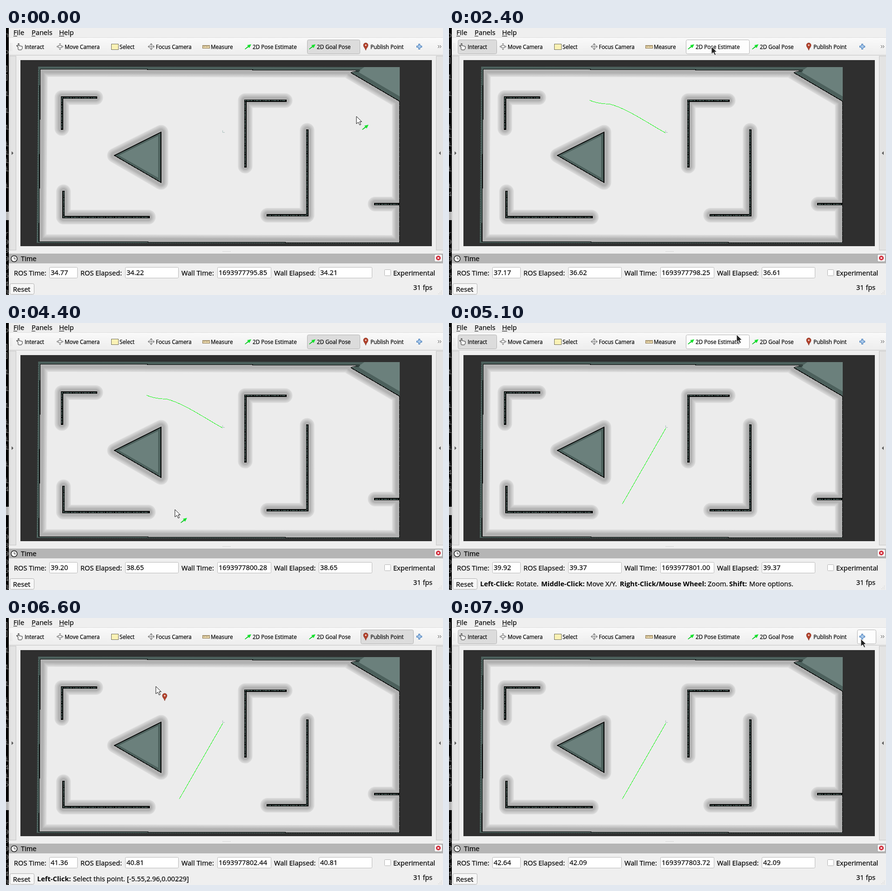
An HTML page for the animation above (8000 ms loop, 939 by 574 pixels).

```html
<!DOCTYPE html>
<html lang="en">
<head>
<meta charset="utf-8">
<title>Map viewer</title>
<style>
html, body { margin: 0; width: 100%; height: 100%; overflow: hidden; background: #efefef; }
svg { display: block; width: 939px; height: 574px; }
text { font: 14.6px "Open Sans", "Noto Sans", sans-serif; fill: #000; stroke: #000; stroke-width: .25px; white-space: pre; }
.tool { font-size: 11.7px; }
.bold { font-weight: 700; stroke: none; }
.term { font: 15px "Liberation Mono", monospace; fill: #858585; stroke: none; }
.field { fill: #fff; stroke: #b9b9b9; }
.crisp { shape-rendering: crispEdges; }
</style>
</head>
<body>
<svg viewBox="0 0 939 574" xmlns="http://www.w3.org/2000/svg">
  <defs>
    <linearGradient id="bar" x2="0" y2="1">
      <stop stop-color="#fafafa"/><stop offset="1" stop-color="#ededed"/>
    </linearGradient>
    <clipPath id="free"><path d="M74 89L759 91L741 96L845 157V461L71 459Z"/></clipPath>
    <clipPath id="map"><rect x="31" y="69" width="815" height="400"/></clipPath>
    <clipPath id="log"><rect width="6" height="368"/></clipPath>
    <g id="arrow">
      <path d="M-7 5L0 -1L-2 -3L7 -5L3 3L1 1L-6 6Z" fill="#12e32b"/>
      <path d="M-6 5L1 0" stroke="#0aa51d" fill="none"/>
    </g>
    <g id="pin">
      <path d="M0 8C-1 3 -5 1 -5 -3A5 5 0 0 1 5 -3C5 1 1 3 0 8Z" fill="#b2402a" stroke="#7c2d20" stroke-width=".7"/>
      <circle cy="-3" r="1.7" fill="#f3ddd6"/>
    </g>
    <g id="cross" fill="none" stroke="#777">
      <path d="M0 -7V7M-7 0H7M-2 -5L0 -7L2 -5M-2 5L0 7L2 5M-5 -2L-7 0L-5 2M5 -2L7 0L5 2"/>
    </g>
  </defs>

  <rect width="939" height="574" fill="#efefef"/>
  <rect width="6" height="574" fill="#000"/>
  <g clip-path="url(#log)"><g id="lines"></g></g>
  <rect y="395" width="6" height="18" fill="#b8b8b8"/>
  <g id="pane"></g>

  <rect x="6" y="20" width="933" height="38" fill="url(#bar)"/>
  <path d="M6 20.500H939" stroke="#dedede"/>
  <path d="M6 58.500H939" stroke="#c4c4c4"/>
  <path d="M9.500 33V49M12.500 33V49" stroke="#c2c2c2" stroke-dasharray="1 2"/>
  <path d="M16 17.500H24M55 17.500H63M114 17.500H125" stroke="#000"/>
  <g id="buttons"></g>
  <g id="icons">
    <path d="M26 46V41L23 39V37L26 39V33.500H28V38L35 39.500V44L33 47H27Z" fill="#fff" stroke="#222"/>
    <use href="#cross" x="116" y="40"/>
    <rect x="112.500" y="37.500" width="7" height="5" fill="#eee" stroke="#777"/>
    <rect x="226.500" y="34.500" width="15" height="12" fill="#fbf2b5" stroke="#33331f" stroke-dasharray="2 1"/>
    <use href="#cross" x="312" y="40"/>
    <circle cx="312" cy="40" r="4.500" fill="none" stroke="#777"/>
    <rect x="422.500" y="37.500" width="15" height="6" fill="#ead9ae" stroke="#85714b"/>
    <path d="M425.500 38V41M428.500 38V40M431.500 38V41M434.500 38V40" stroke="#85714b"/>
    <use href="#arrow" x="520" y="40"/>
    <use href="#arrow" x="658" y="40"/>
    <use href="#pin" x="773" y="40"/>
    <path d="M886.500 34.500H889.500V38.500H893.500V41.500H889.500V45.500H886.500V41.500H882.500V38.500H886.500Z" fill="#b9d6f4" stroke="#2a67ac"/>
    <path d="M928 37L931 40L928 43M932 37L935 40L932 43" fill="none" stroke="#444"/>
  </g>

  <rect x="7.500" y="60.500" width="14" height="417" fill="#e3e3e3" stroke="#c6c6c6"/>
  <rect x="924.500" y="60.500" width="15" height="417" fill="#e3e3e3" stroke="#c6c6c6"/>
  <path d="M12 265V273L16 269ZM934 265V273L930 269Z" fill="#555"/>

  <rect x="31" y="69" width="884" height="400" fill="#2f2f2f"/>
  <path d="M69 83L846 84V463L66 462Z" fill="#4c605c"/>
  <path d="M74 89L759 91L741 96L845 157V461L71 459Z" fill="#ececec"/>
  <g id="halo" clip-path="url(#free)" fill="none" stroke-linecap="round" stroke-linejoin="round"></g>
  <path d="M756 94L770 84H846V147Z" fill="#6b807c"/>
  <circle cx="756" cy="91" r="5" fill="#4c605c"/>
  <g class="crisp" fill="none" stroke="#000">
    <path d="M760 90.500H530V89.500H304V88.500H73.500L71 459.500H305V460.500H600V461.500H845" stroke-width="1.500"/>
    <path d="M741 96L845 157" stroke-width="1.500"/>
    <path d="M845.500 157V462" stroke-dasharray="9 1"/>
    <path d="M69.500 88L67.500 456M76 462.500H840" stroke="#1d2725" stroke-dasharray="1 4"/>
    <path d="M741 96L748 93L758 94"/>
    <path d="M233 274L333 224V332Z" fill="#4c605c" stroke-width="1.500"/>
  </g>
  <path d="M243 274L327 232V322Z" fill="#6b807c"/>
  <g id="walls" class="crisp" clip-path="url(#map)" fill="none"></g>
  <path d="M465.500 220V224.500H470" fill="none" stroke="#a9c0bd"/>
  <path id="route" class="crisp" fill="none" stroke="#1df51d"/>

  <path d="M466 480.500H482" stroke="#aaa" stroke-dasharray="1 2"/>
  <rect x="6" y="485" width="933" height="21" fill="#b5b5b5"/>
  <circle cx="17.500" cy="496" r="6.500" fill="#fff" stroke="#222" stroke-width="1.500"/>
  <path d="M17.500 492V496.500H21" fill="none" stroke="#222"/>
  <rect x="920.500" y="486.500" width="17" height="16" rx="3" fill="#f5f5f5" stroke="#999"/>
  <circle cx="929" cy="494.500" r="5" fill="#cf2130"/>
  <path d="M927 492.500L931 496.500M931 492.500L927 496.500" stroke="#fff" stroke-width="1.300"/>
  <g id="fields"></g>
  <rect x="813.500" y="519.500" width="13" height="13" rx="1" fill="#fff" stroke="#b5b5b5"/>
  <rect x="8.500" y="549.500" width="52" height="23" rx="3" fill="#f7f7f7" stroke="#b0b0b0"/>
  <path d="M929 571.500H938M932 568.500H938M935 565.500H938" stroke="#bbb" stroke-dasharray="1 2"/>
  <g id="labels"></g>
  <g id="status"></g>

  <g id="cursor">
    <path id="pointer" d="M0 0V16L4 12.500L7 18.500L9.500 17.500L6.800 11.500H11.500Z"/>
    <use id="badge" x="19" y="23"/>
  </g>
</svg>
<script>
const LOOP = 8000, STEP = 100;
const $ = id => document.getElementById(id);

function add(parent, tag, attrs, text = '') {
  const el = document.createElementNS('http://www.w3.org/2000/svg', tag);
  for (const k in attrs) el.setAttribute(k, attrs[k]);
  el.textContent = text;
  return parent.appendChild(el);
}
const label = (parent, x, y, text, cls = '') => add(parent, 'text', { x, y, class: cls }, text);

// Map obstacles and their inflated cost bands
const walls = [
  'M193 149.5H120V216', 'M123.5 352V406.5H306', 'M600 156H514V297',
  'M647 220V402.5H562', 'M793 378.5H845'
].join('');
const outlines = walls + 'M233 274L333 224V332ZM74 89L759 91L741 96L845 157V461L71 459Z';
const bands = [[15.5, '#d8d8d8'], [13, '#cccccc'], [10.5, '#bfbfbf'], [8, '#b1b1b1']];
for (const [r, stroke] of bands) add($('halo'), 'path', { d: outlines, stroke, 'stroke-width': 2 * r });
add($('walls'), 'path', { d: walls, stroke: '#000', 'stroke-width': 5, 'stroke-linecap': 'square' });
add($('walls'), 'path', { d: walls, stroke: '#4c605c', 'stroke-width': 2, 'stroke-dasharray': '7 1 3 2 5 1' });

// Toolbar: button edges and caption position
const tools = {
  interact: [19, 103, 'Interact', 40], move: [104, 219, 'Move Camera', 126],
  select: [220, 299, 'Select', 244], focus: [300, 416, 'Focus Camera', 322],
  measure: [417, 508, 'Measure', 440], pose: [509, 646, '2D Pose Estimate', 530],
  goal: [647, 761, '2D Goal Pose', 668], publish: [762, 876, 'Publish Point', 783],
  plus: [877, 918, '', 0]
};
const buttons = {};
for (const [name, [x0, x1, text, x]] of Object.entries(tools)) {
  buttons[name] = add($('buttons'), 'rect', { x: x0 + .5, y: 25.5, width: x1 - x0 - 1, height: 30, rx: 3 });
  label($('icons'), x, 45, text, 'tool');
}

const captions = [
  [16, 15, 'File'], [55, 15, 'Panels'], [114, 15, 'Help'], [32, 501, 'Time'],
  [17, 532, 'ROS Time:'], [160, 532, 'ROS Elapsed:'], [377, 532, 'Wall Time:'],
  [576, 532, 'Wall Elapsed:'], [832, 532, 'Experimental'], [15, 567, 'Reset'], [875, 563, '31 fps']
];
captions.forEach(c => label($('labels'), ...c));

const values = [[93, 61], [256, 115], [454, 116], [672, 115]].map(([x, width]) => {
  add($('fields'), 'rect', { x: x + .5, y: 514.5, width: width - 1, height: 23, rx: 2, class: 'field' });
  return label($('fields'), x + 3, 531, '');
});

// Terminal edge behind the window
const column = (id, y, chars) =>
  [...chars].forEach((c, i) => label($(id), -3, y + 18 * i, c, 'term'));
column('lines', 20, 'h o ]] 1 1 1 iiii i i4i5');
column('pane', 447, 'r9890543');

// Timelines
const cursorKeys = [
  [0, 753, 190], [600, 302, 155], [900, 230, 136], [1200, 180, 109], [1600, 300, 95],
  [2100, 510, 50], [2400, 564, 40], [2600, 570, 41], [2900, 670, 80], [3200, 690, 60],
  [3400, 678, 43], [3600, 676, 42], [3800, 650, 90], [4300, 372, 389], [4600, 345, 425],
  [4800, 470, 230], [5100, 618, 25], [5500, 760, 38], [5800, 800, 41], [6100, 620, 85],
  [6600, 322, 147], [7000, 322, 147], [7400, 620, 100], [7900, 885, 45]
];
const clockKeys = [[0, 0], [1200, 1.21], [2400, 2.4], [3600, 3.61], [5100, 5.15], [6600, 6.59], [7900, 7.87]];
const toolKeys = [[0, 'goal'], [1100, 'interact'], [2600, 'pose'], [3400, 'goal'], [4700, 'interact'], [5800, 'publish'], [7000, 'interact']];
const badgeKeys = [[0, 'arrow'], [1300, ''], [2600, 'arrow'], [4700, ''], [5800, 'pin'], [7000, '']];
const statusKeys = [[0, ''], [1100, 'rotate'], [1700, ''], [2600, 'drag'], [3700, ''], [4700, 'rotate'], [5200, ''], [6400, 'point'], [7000, 'rotate'], [7400, '']];
const routeKeys = [[0, ''], [1100, 'M302 155C314 161 330 163 345 163.5C380 172 420 200 465 225.5'], [4700, 'M466 226L372.5 389']];
const scrollKeys = [[0, 0], [1100, -36], [4700, -72]];

const held = (keys, t) => keys.filter(k => k[0] <= t).pop()[1];
function tween(keys, t) {
  const i = keys.findIndex(k => k[0] > t);
  if (i < 0) return keys[keys.length - 1].slice(1);
  const a = keys[i - 1], b = keys[i], p = (t - a[0]) / (b[0] - a[0]);
  return a.slice(1).map((v, j) => v + (b[j + 1] - v) * p);
}

const hints = {
  '': () => [],
  rotate: () => [
    [67, 'Left-Click:', 1], [144, 'Rotate.'], [198, 'Middle-Click:', 1], [295, 'Move X/Y.'],
    [367, 'Right-Click/Mouse Wheel:', 1], [556, 'Zoom.'], [602, 'Shift:', 1], [645, 'More options.']
  ],
  drag: () => [[67, 'Click and drag mouse to set position/orientation.']],
  point: (x, y) => [
    [67, 'Left-Click:', 1],
    [144, `Select this point. [${((x - 465.1) / 25.8).toFixed(2)},${((223.4 - y) / 25.8).toFixed(2)},0.00229]`]
  ]
};

function draw(t) {
  const [x, y] = tween(cursorKeys, t), onMap = y > 69;
  const active = held(toolKeys, t);

  for (const name in tools) {
    const [x0, x1] = tools[name], on = name === active;
    const hover = y >= 25 && y < 57 && x >= x0 && x <= x1;
    buttons[name].setAttribute('fill', on ? '#dcdcdc' : hover ? '#fdfdfd' : 'none');
    buttons[name].setAttribute('stroke', on || hover ? '#b3b3b3' : 'none');
  }

  const [run] = tween(clockKeys, t);
  const lag = t / STEP % 24 ? 0 : .01;
  const clocks = [34.77 + run, 34.22 + run, 1693977795.85 + run, 34.22 + run - lag];
  clocks.forEach((v, i) => values[i].textContent = v.toFixed(2));

  $('status').textContent = '';
  for (const [sx, text, bold] of hints[held(statusKeys, t)](x, y))
    label($('status'), sx, 566, text, bold ? 'bold' : '');

  $('route').setAttribute('d', held(routeKeys, t));
  $('lines').setAttribute('transform', `translate(0 ${held(scrollKeys, t)})`);

  const badge = held(badgeKeys, t);
  $('cursor').setAttribute('transform', `translate(${Math.round(x)} ${Math.round(y)})`);
  $('pointer').setAttribute('fill', onMap ? '#fff' : '#222');
  $('pointer').setAttribute('stroke', onMap ? '#111' : '#eee');
  $('badge').setAttribute('href', onMap && badge ? '#' + badge : '#none');
}

const start = performance.now();
let shown = -1;
function tick() {
  const t = Math.floor((performance.now() - start) % LOOP / STEP) * STEP;
  if (t !== shown) draw(shown = t);
  requestAnimationFrame(tick);
}
tick();
</script>
</body>
</html>
```
